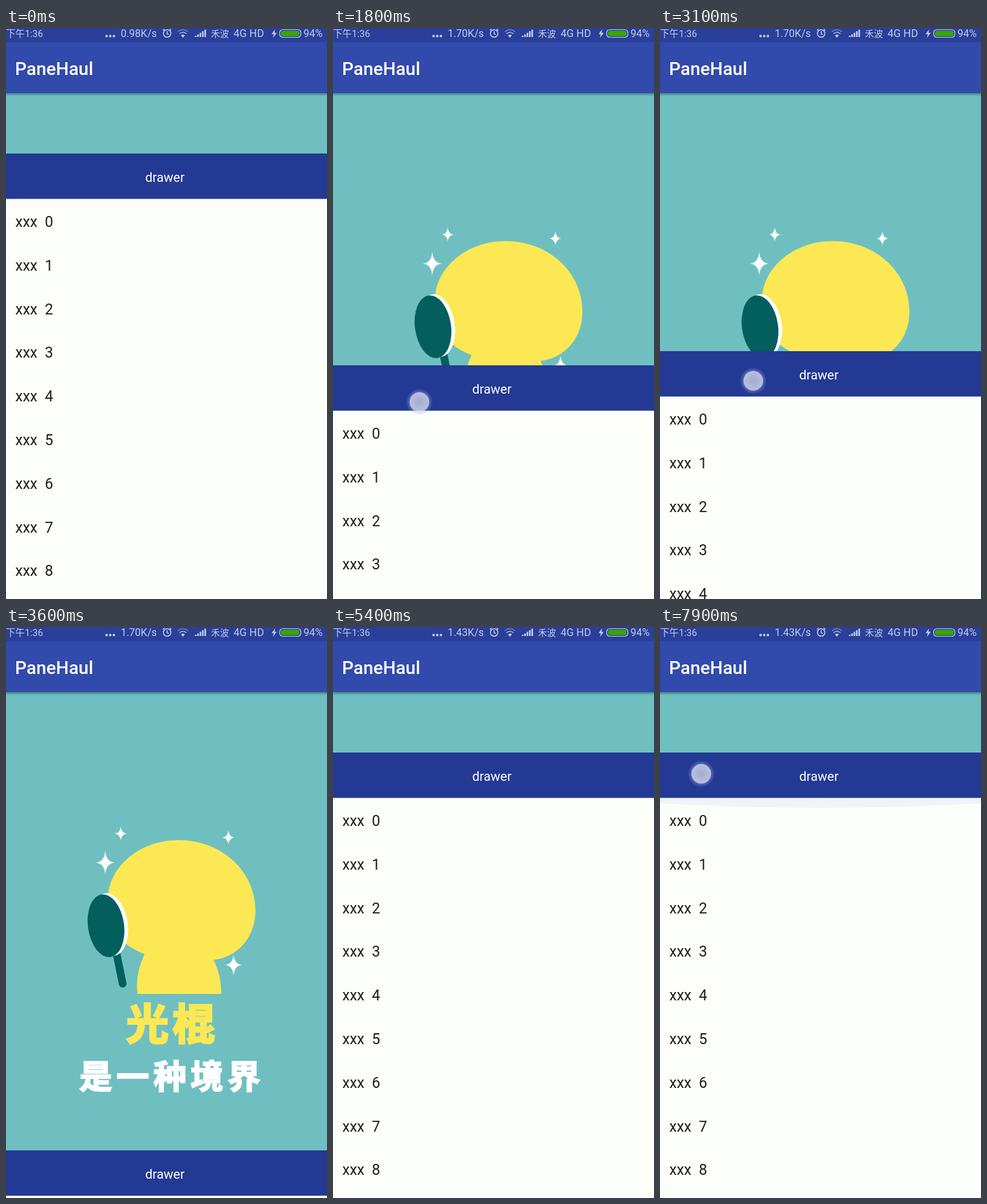
Write an HTML page that moves like this. It is 498 by 887 pixels and loops after 8000 ms.

```html
<!DOCTYPE html>
<html lang="zh">
<head>
<meta charset="utf-8">
<title>Drawer</title>
<style>
  html, body { margin: 0; width: 100%; height: 100%; overflow: hidden; background: #fcfefa; }
  svg { display: block; width: 498px; height: 887px; }
  text { font-family: Roboto, "Noto Sans CJK SC", "Noto Sans CJK", sans-serif; }
  .status { fill: #c6cce8; font-size: 16px; }
  .title { fill: #fff; font-size: 28px; font-weight: 500; }
  .label { fill: #fff; font-size: 20px; }
  .row { fill: #1c1e1c; font-size: 23px; }
  .slogan { font-weight: 900; text-anchor: middle; stroke-linejoin: miter; }
  .line { fill: none; stroke: #c6cce8; stroke-width: 1.5; }
</style>
</head>
<body>
<svg viewBox="0 0 498 887">
  <defs>
    <radialGradient id="dot">
      <stop offset="0" stop-color="#d2d6ea" stop-opacity=".72"/>
      <stop offset=".66" stop-color="#dde0ef" stop-opacity=".8"/>
      <stop offset=".7" stop-color="#dde0ef" stop-opacity=".8"/>
      <stop offset=".75" stop-color="#a9b4e4" stop-opacity=".35"/>
      <stop offset="1" stop-color="#a9b4e4" stop-opacity="0"/>
    </radialGradient>
    <linearGradient id="shade" x2="0" y2="1">
      <stop offset="0" stop-color="#1d5a5c" stop-opacity=".6"/>
      <stop offset="1" stop-color="#1d5a5c" stop-opacity="0"/>
    </linearGradient>
    <clipPath id="listArea"><rect y="70" width="498" height="622"/></clipPath>
  </defs>

  <rect y="101" width="498" height="786" fill="#6fbfc1"/>
  <g id="art">
    <path fill="#fbe854" d="M204 570Q200 540 215 508C180 495 158 470 158 425C158 370 210 331 268 331C335 331 387 380 387 440C387 490 350 515 322 517Q334 540 334 570Z"/>
    <path stroke="#035f5d" stroke-width="12" stroke-linecap="round" d="M170 500L181 554"/>
    <g transform="rotate(-8 156 463)">
      <ellipse cx="161" cy="463" rx="28" ry="49" fill="#fff"/>
      <ellipse cx="155" cy="464" rx="28" ry="49" fill="#035f5d"/>
    </g>
    <path id="stars" fill="#fff"/>
    <text class="slogan" x="258.500" y="641" font-size="66" letter-spacing="6" fill="#fbe854" stroke="#fbe854" stroke-width="3">光棍</text>
    <text class="slogan" x="257.500" y="717" font-size="51" letter-spacing="6.500" fill="#fff" stroke="#fff" stroke-width="2">是一种境界</text>
  </g>

  <g id="drawer">
    <rect y="70" width="498" height="900" fill="#fcfefa"/>
    <g clip-path="url(#listArea)">
      <g id="rows"></g>
      <path id="topGlow" fill="#3f51b5" opacity=".06" d="M0 0H498V8Q249 22 0 8Z"/>
      <path id="endGlow" fill="#3f51b5" opacity=".06" d="M0 0H498V-8Q249 -22 0 -8Z"/>
    </g>
    <rect width="498" height="70.500" fill="#233994"/>
    <text class="label" x="216" y="43.500">drawer</text>
  </g>

  <rect y="101" width="498" height="5" fill="url(#shade)"/>
  <rect y="22" width="498" height="79" fill="#324aac"/>
  <rect width="498" height="22" fill="#293f99"/>
  <text class="title" x="14" y="73">PaneHaul</text>

  <g class="status">
    <text x="0" y="14" font-size="14.600">下午1:36</text>
    <circle cx="156" cy="12.500" r="1.900"/><circle cx="161.700" cy="12.500" r="1.900"/><circle cx="167.400" cy="12.500" r="1.900"/>
    <text id="speed" x="234" y="14" text-anchor="end"></text>
    <g class="line">
      <circle cx="250" cy="8.500" r="5.800"/>
      <path d="M250 5V9L252.500 10M243.500 4L246 1.500M256.500 4L254 1.500"/>
      <path opacity=".5" d="M266.500 6Q274.500 -1 282.500 6"/>
      <path opacity=".8" d="M269 9Q274.500 4.500 280 9"/>
    </g>
    <path d="M271.500 11.500Q274.500 9 277.500 11.500L274.500 15Z"/>
    <path d="M293 12h2.500v2h-2.500zM296.700 10h2.500v4h-2.500zM300.400 7.500h2.500v6.500h-2.500zM304.100 5h2.500v9h-2.500zM307.800 2.500h2.500v11.500h-2.500z"/>
    <text x="318" y="14" font-size="14">禾波</text>
    <text x="353" y="14" font-size="16.500">4G HD</text>
    <path d="M417.500 2L412 9.500H415.500L414 15.500L420 7.500H416.500Z"/>
    <rect x="424.500" y="2.500" width="33" height="12" rx="5" fill="none" stroke="#c6cce8" stroke-width="1.200"/>
    <rect x="426.500" y="4.300" width="29" height="8.400" rx="3.500" fill="#3aa606"/>
    <text x="461.500" y="14">94%</text>
  </g>

  <circle id="touch" r="21" fill="url(#dot)"/>
</svg>
<script>
const LOOP = 8000, STEP = 100, ROW = 67.8, COUNT = 20;
const LIST_H = 621, END = COUNT * ROW - LIST_H;
const SHUT = 195, OPEN = 816;
const $ = id => document.getElementById(id);

// Tracks are [time, value] points joined by straight lines.
const pull = [[1000, SHUT], [1200, 225], [1800, 524], [1900, 548]];
const open = [[2600, SHUT], [2700, 266], [3300, 620]];
const shut = [[4200, OPEN], [4300, 785], [4500, 685], [4900, 455]];
const scroll = [[6300, 0], [6400, 30], [6500, 130], [6700, 430], [6900, 660], [7000, END],
  [7200, END], [7300, 640], [7500, 280], [7700, 0]];
const topGlow = [[7600, 0], [7700, 1.6], [7900, 1]];
const endGlow = [[6900, 0], [7000, 4], [7100, 3], [7300, 0]];

// Each stroke holds [time, x, y] points; the finger lifts after the last one.
const strokes = [
  [[900, 82, 241], [1000, 83, 245], [1200, 88, 282], [1800, 134, 581], [1900, 138, 605]],
  [[2500, 96, 228], [2600, 97, 234], [2700, 114, 312], [3300, 160, 666]],
  [[4100, 176, 847], [4200, 175, 838], [4300, 172, 804], [4500, 164, 704], [4900, 136, 474]],
  [[6300, 168, 706], [6400, 165, 670], [6700, 140, 380]],
  [[7200, 125, 400], [7300, 130, 480], [7500, 150, 740]],
  [[7900, 64, 228], [8000, 64, 228]]
];

function at(track, t, k = 1) {
  if (t <= track[0][0]) return track[0][k];
  const i = track.findIndex(p => p[0] >= t);
  if (i < 0) return track[track.length - 1][k];
  const a = track[i - 1], b = track[i];
  return a[k] + (b[k] - a[k]) * (t - a[0]) / (b[0] - a[0]);
}

// After release the drawer eases to its end stop.
function settle(track, t, goal) {
  const [end, from] = track[track.length - 1];
  if (t <= end) return at(track, t);
  const left = Math.max(0, 1 - (t - end) / 520);
  return goal + (from - goal) * left ** 5;
}

function drawerTop(t) {
  if (t < 2500) return settle(pull, t, SHUT);
  if (t < 4100) return settle(open, t, OPEN);
  return settle(shut, t, SHUT);
}

function star(x, y, w, h) {
  return `M${x} ${y - h}Q${x + 1} ${y - 1} ${x + w} ${y}Q${x + 1} ${y + 1} ${x} ${y + h}` +
    `Q${x - 1} ${y + 1} ${x - w} ${y}Q${x - 1} ${y - 1} ${x} ${y - h}Z`;
}

$('stars').setAttribute('d', star(178, 321, 9, 11) + star(345, 327, 9, 11) +
  star(154, 366, 15, 19) + star(353, 525, 13, 17));

for (let i = 0; i < COUNT; i++) {
  const row = document.createElementNS('http://www.w3.org/2000/svg', 'text');
  row.setAttribute('class', 'row');
  row.setAttribute('x', 14.5);
  row.setAttribute('y', 114 + i * ROW);
  row.textContent = `xxx\u00a0\u00a0${i}`;
  $('rows').append(row);
}

const move = (id, x, y, sy = 1) =>
  $(id).setAttribute('transform', `translate(${x} ${y}) scale(1 ${sy})`);

function draw(t) {
  move('drawer', 0, Math.round(drawerTop(t)));
  move('rows', 0, -at(scroll, t));
  move('topGlow', 0, 71, at(topGlow, t));
  move('endGlow', 0, 71 + LIST_H, at(endGlow, t));
  $('speed').textContent = (t < 100 ? '0.98' : t < 5000 ? '1.70' : '1.43') + 'K/s';
  const s = strokes.find(p => t >= p[0][0] && t <= p[p.length - 1][0]);
  $('touch').setAttribute('visibility', s ? 'visible' : 'hidden');
  if (s) move('touch', at(s, t, 1), at(s, t, 2));
}

const start = performance.now();
function tick() {
  const t = (performance.now() - start) % LOOP;
  draw(Math.floor(t / STEP) * STEP);
  requestAnimationFrame(tick);
}
tick();
</script>
</body>
</html>
```
